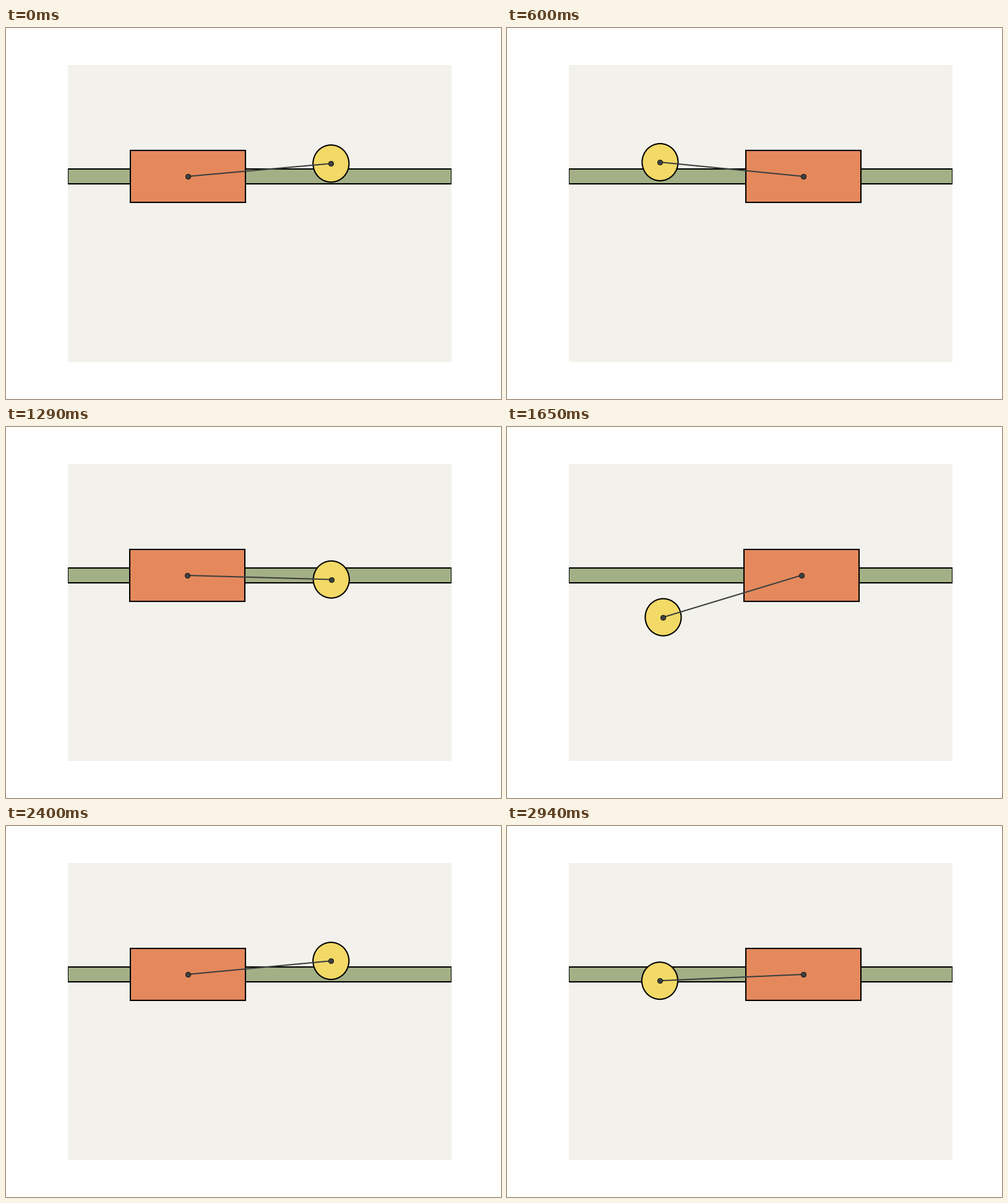
Write a matplotlib script that moves like this. It is 800 px wide and 600 px high and loops after 2.97 s.

```python
import numpy as np
import matplotlib.pyplot as plt
from matplotlib.animation import FuncAnimation
from matplotlib.patches import Circle, Rectangle

FRAMES, INTERVAL = 99, 30
G, ROD = 9.81, 2.4
CART_M, BOB_M = 3, 2
COUPLING = BOB_M / CART_M            # pull of the cart on the swing
RECOIL = BOB_M / (CART_M + BOB_M)    # cart travel per bob travel
START_X, START_ANGLE = -0.5 * ROD, np.pi / 2 + 0.1
DT, SUBSTEPS = 8 / 99, 40

CART_W, CART_H, RAIL_H, BOB_R = 1.92, 0.84, 0.24, 0.3
INK = "#3c403f"


def derivative(state):
    angle, speed = state
    s, c = np.sin(angle), np.cos(angle)
    accel = -(G / ROD * s + COUPLING * speed**2 * s * c) / (1 - COUPLING * c**2)
    return np.array([speed, accel])


def rk4(state, h):
    k1 = derivative(state)
    k2 = derivative(state + h / 2 * k1)
    k3 = derivative(state + h / 2 * k2)
    k4 = derivative(state + h * k3)
    return state + h / 6 * (k1 + 2 * k2 + 2 * k3 + k4)


def swing():
    """Angle of the pendulum at each step after its release from rest."""
    state, angles = np.array([START_ANGLE, 0.0]), []
    for _ in range(FRAMES):
        for _ in range(SUBSTEPS):
            state = rk4(state, DT / SUBSTEPS)
        angles.append(state[0])
    return np.array(angles)


angles = swing()
# The centre of mass stays put along the rail.
cart_x = START_X - RECOIL * ROD * (np.sin(angles) - np.sin(START_ANGLE))
bob_x = cart_x + ROD * np.sin(angles)
bob_y = -ROD * np.cos(angles)

fig = plt.figure(figsize=(8, 6), dpi=100, facecolor="white")
ax = fig.add_axes([0.125, 0.1, 0.775, 0.8], facecolor="#f2f1eb")
ax.set(xlim=(-3.2, 3.2), ylim=(-3, 1.8), xticks=[], yticks=[])
ax.spines[:].set_visible(False)

edge = dict(ec="black", lw=1.5)
rail = Rectangle((-3.2, -RAIL_H / 2), 6.4, RAIL_H, fc="#a3b086", zorder=1, **edge)
cart = Rectangle((0, -CART_H / 2), CART_W, CART_H, fc="#e5895d", zorder=2, **edge)
bob = Circle((0, 0), BOB_R, fc="#f3d966", zorder=3, **edge)
for patch in (rail, cart, bob):
    ax.add_patch(patch)
rod, = ax.plot([], [], color=INK, lw=1.5, marker="o", ms=6,
               mfc=INK, mec="black", mew=0.5, zorder=4)


def update(i):
    cart.set_x(cart_x[i] - CART_W / 2)
    bob.center = bob_x[i], bob_y[i]
    rod.set_data([cart_x[i], bob_x[i]], [0, bob_y[i]])
    return cart, bob, rod


anim = FuncAnimation(fig, update, frames=FRAMES, interval=INTERVAL,
                     repeat=True, repeat_delay=0, blit=False)
plt.show()
```
